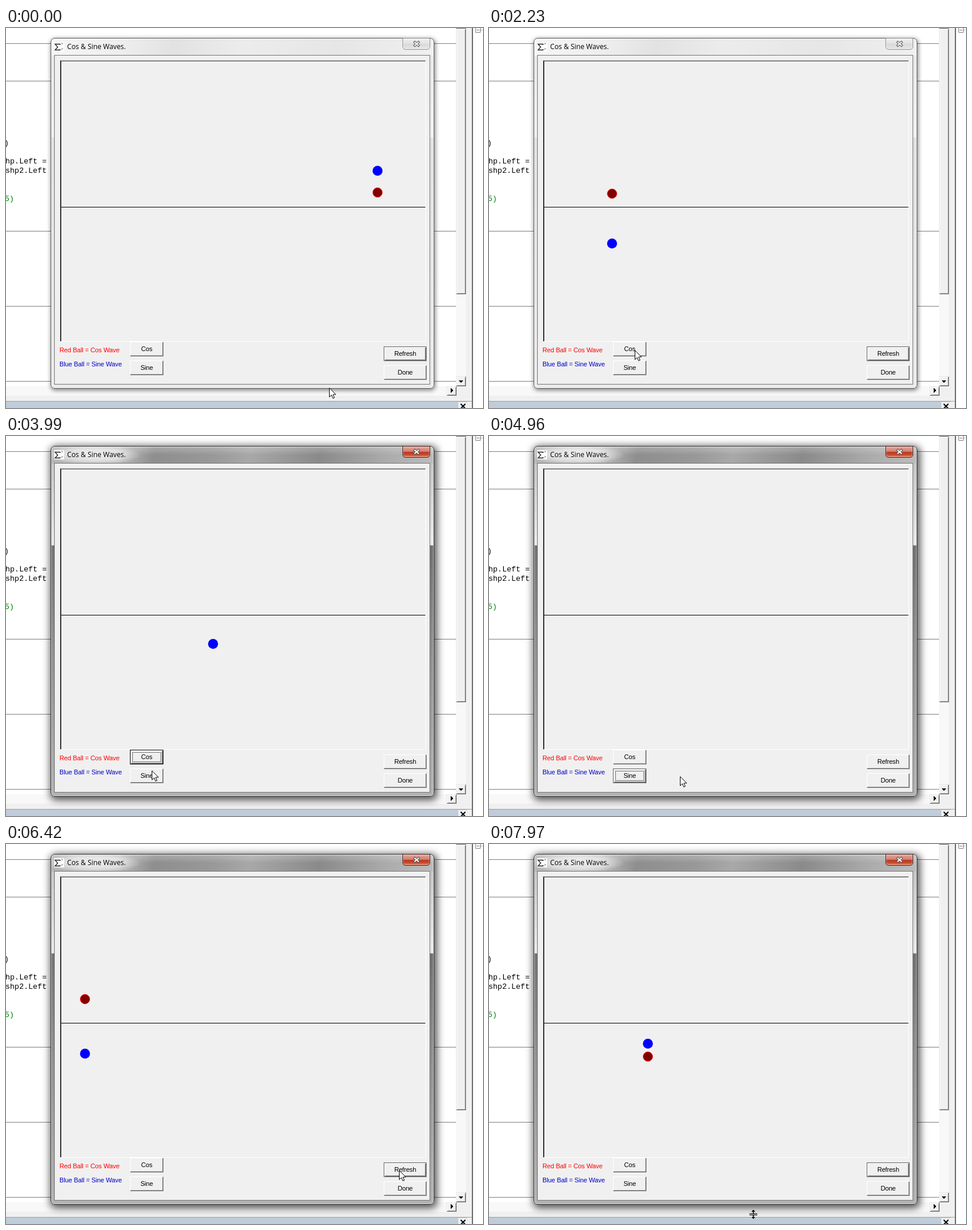
These frames come from a looping animation (812 px wide and 648 px high, 8000 ms). An HTML page:

```html
<!DOCTYPE html>
<html lang="en">
<head>
<meta charset="utf-8">
<title>Cos &amp; Sine Waves</title>
<style>
html, body { margin: 0; width: 100%; height: 100%; overflow: hidden; background: #fff; }
#stage { position: relative; width: 812px; height: 648px; overflow: hidden; background: #fff; }
#stage div, #stage svg { position: absolute; box-sizing: border-box; }

/* editor behind the form */
.rule { left: 0; width: 766px; height: 1px; background: #808080; }
.code { font: 13px/16px "Liberation Mono", monospace; white-space: pre; color: #000; }
.raised { background: #f0f0f0; border: 1px solid; border-color: #e3e3e3 #696969 #696969 #e3e3e3;
  box-shadow: inset 1px 1px #fff, inset -1px -1px #a0a0a0; }

/* form */
.win { inset: 0; transform-origin: 402px 305px; }
.frame { left: 76px; top: 17px; width: 653px; height: 598px; border: 1px solid #5c5c5c; border-radius: 7px;
  background: linear-gradient(100deg, #f6f6f6 0, #ededed 20%, #e2e2e2 32%, #ececec 50%, #e6e6e6 75%, #f0f0f0) 0 0 / 100% 29px no-repeat,
    linear-gradient(#e6e6e6, #f0f0f0 168px, #e0e0e0 169px, #ebebeb);
  box-shadow: inset 0 0 0 1px #fffb, 1px 2px 7px 1px #0007; }
.active .frame { border-color: #2e2e2e;
  background: radial-gradient(ellipse 82px 17px at 72px 14px, #fffc, #fff8 60%, #fff0) no-repeat,
    linear-gradient(#fff4, #fff0 14px) 0 0 / 100% 29px no-repeat,
    linear-gradient(100deg, #b4b4b4 0, #bcbcbc 18%, #8e8e8e 27%, #989898 42%, #a8a8a8 52%, #8a8a8a 70%, #acacac 88%, #bcbcbc) 0 0 / 100% 29px no-repeat,
    linear-gradient(#bcbcbc, #e9e9e9 168px, #707070 169px, #8c8c8c 330px, #b2b2b2);
  box-shadow: inset 0 0 0 1px #fff9, 2px 3px 13px 3px #000a; }
.icon { left: 82px; top: 24px; width: 17px; height: 16px; background: #fff; }
.title { left: 104px; top: 23px; font: 11.8px/17px "Open Sans", "Noto Sans", sans-serif; white-space: nowrap; color: #000; }
.close { left: 675px; top: 17px; width: 47px; height: 20px; border: 1px solid #8d8d8d; border-radius: 0 0 5px 5px;
  background: linear-gradient(#efefef, #e2e2e2 50%, #d8d8d8 51%, #e6e6e6); box-shadow: inset 0 0 0 1px #fff9; }
.active .close { border-color: #4b1a14;
  background: linear-gradient(#e5aaa0, #d27a6b 48%, #b93a24 50%, #c4452c 75%, #e08a6a); box-shadow: inset 0 0 0 1px #fff5; }
.client { left: 82px; top: 46px; width: 640px; height: 562px; background: #f0f0f0; border: 1px solid #777; }
.pic { left: 92px; top: 55px; width: 623px; height: 480px; overflow: hidden; background: #f0f0f0;
  border: 1px solid; border-color: #a0a0a0 #fff #fff #696969; box-shadow: inset 1px 0 #000, inset 0 1px #696969; }
.axis { left: 1px; top: 249px; width: 620px; height: 1px; background: #000; }
.ball { left: 0; top: 0; width: 17px; height: 17px; border-radius: 50%; }
.blue { background: #00f; }
.red { background: #800000; border: 1px solid #f00; }
.label, .btn { font: 11px/13px "Liberation Sans", Arial, sans-serif; white-space: nowrap; }
.label { left: 91px; letter-spacing: -.12px; }
.btn { color: #000; text-align: center; line-height: 22px; letter-spacing: -.2px; background: #f0f0f0;
  border: 1px solid; border-color: #fff #696969 #696969 #fff; box-shadow: inset -1px -1px #a0a0a0; }
.btn.main { border-color: #646464; box-shadow: inset 1px 1px #fff, inset -1px -1px #696969, inset -2px -2px #a0a0a0; }
.btn.cos.main { border-color: #000; }
.btn.down { box-shadow: inset 0 0 0 1px #a0a0a0; padding: 1px 0 0 1px; }
.btn.focus::after { content: ""; position: absolute; inset: 3px; border: 1px dotted #000; }
.cos, .sine { left: 211px; width: 57px; height: 25px; }
.refresh, .done { left: 643px; width: 73px; height: 25px; }
#veil { left: 62px; top: 8px; width: 685px; height: 619px; background: #0000000f; }
</style>
</head>
<body>
<div id="stage">
  <div class="rule" style="top:26px"></div>
  <div class="rule" style="top:90px"></div>
  <div class="rule" style="top:346px"></div>
  <div class="rule" style="top:474px"></div>
  <div class="rule" style="top:602px"></div>
  <div class="code" style="left:-3px;top:189px">)</div>
  <div class="code" style="left:-1px;top:220px">hp.Left = 0</div>
  <div class="code" style="left:-1px;top:236px">shp2.Left = 0</div>
  <div class="code" style="left:-2px;top:284px;color:#008000">5)</div>

  <div style="left:0;top:611px;width:783px;height:16px;background:#f8f8f8"></div>
  <div style="left:766px;top:0;width:17px;height:611px;background:#f8f8f8"></div>
  <div class="raised" style="left:766px;top:-16px;width:17px;height:17px"></div>
  <div class="raised" style="left:766px;top:1px;width:17px;height:453px"></div>
  <div class="raised" style="left:766px;top:594px;width:17px;height:17px"></div>
  <div class="raised" style="left:750px;top:611px;width:17px;height:16px"></div>
  <div style="left:767px;top:611px;width:27px;height:37px;background:#f0f0f0"></div>
  <div style="left:783px;top:0;width:11px;height:648px;background:#f0f0f0"></div>
  <div style="left:0;top:627px;width:794px;height:10px;background:#f0f0f0;border-bottom:1px solid #a0a0a0"></div>
  <div style="left:0;top:637px;width:786px;height:11px;background:#bfcddb"></div>
  <div style="left:770px;top:638px;width:16px;height:10px;background:#f0f0f0"></div>
  <div style="left:793px;top:0;width:2px;height:648px;background:#696969"></div>
  <svg width="812" height="648" style="left:0;top:0">
    <path d="M770 601h8l-4 4zM757 614v8l4-4z" shape-rendering="crispEdges"/>
    <path d="M774 641l8 8M782 641l-8 8" stroke="#000" stroke-width="2"/>
    <path d="M799.5 -1.5h8v9h-8zM801 3.5h5" fill="none" stroke="#808080"/>
    <path d="M808 3.5h4" stroke="#808080" stroke-dasharray="1"/>
  </svg>

  <div id="veil"></div>
  <template id="form">
    <div class="win">
      <div class="frame"></div>
      <div class="icon">
        <svg width="17" height="16" fill="none" stroke="#222">
          <path d="M10 5V3.500H1.500L6 8.500L1.500 13.500H10V12" stroke-width="1.300"/>
          <path d="M12 1l3 3M15 1l-3 3M12 10l1.500 2M15 10l-2.500 4" stroke="#777" stroke-width=".8"/>
        </svg>
      </div>
      <div class="title">Cos &amp; Sine Waves.</div>
      <div class="close">
        <svg width="45" height="18" style="left:0;top:0" fill="none">
          <path d="M18.500 5l9 8M27.500 5l-9 8" stroke="#555" stroke-width="4"/>
          <path d="M19.300 5.700l7.400 6.600M26.700 5.700l-7.400 6.600" stroke="#fff" stroke-width="2"/>
        </svg>
      </div>
      <div class="client"></div>
      <div class="pic">
        <div class="axis"></div>
        <div class="ball red"></div>
        <div class="ball blue"></div>
      </div>
      <div class="label" style="top:543px;color:#f00">Red Ball = Cos Wave</div>
      <div class="label" style="top:567px;color:#0000c8">Blue Ball = Sine Wave</div>
      <div class="btn cos" style="top:535px">Cos</div>
      <div class="btn sine" style="top:567px">Sine</div>
      <div class="btn refresh" style="top:543px">Refresh</div>
      <div class="btn done" style="top:575px">Done</div>
    </div>
  </template>

  <svg id="arrow" width="14" height="21" style="left:0;top:0">
    <path d="M.5 .8V16.300L4.200 12.900L6.600 18.500L9.100 17.400L6.700 12H11.500Z" fill="#fff" stroke="#000"/>
  </svg>
  <svg id="split" width="18" height="18" style="left:0;top:0">
    <path d="M9 0l4 4.500h-3V6.500h6v2H2v-2h6V4.500H5zM9 17l4-4.500h-3V10.500h6v-2H2v2h6v2H5z" stroke="#fff" stroke-width=".6"/>
    <path d="M2 8.500h14" stroke="#fff"/>
  </svg>
</div>
<script>
const LOOP = 8000;
const $ = id => document.getElementById(id);

// Screen refreshes: [time, index], evenly spaced in between.
const anchors = [[0, 0], [150, 1], [1110, 8], [1260, 9], [2230, 16], [2370, 17], [3170, 23], [3330, 24],
  [3470, 25], [4410, 32], [4550, 33], [4960, 36], [5990, 43], [6150, 44], [6420, 46], [7120, 51], [7280, 52], [7970, 57]];
const ticks = [];
anchors.forEach(([t, n], i) => {
  ticks[n] = t;
  const [t0, n0] = anchors[i - 1] || [t, n];
  for (let k = n0 + 1; k < n; k++) ticks[k] = t0 + (t - t0) * (k - n0) / (n - n0);
});

// Linear path through [time, ...values].
function along(points, t) {
  const i = points.findIndex(p => p[0] > t);
  if (i === 0) return points[0].slice(1);
  if (i < 0) return points[points.length - 1].slice(1);
  const a = points[i - 1], b = points[i], f = (t - a[0]) / (b[0] - a[0]);
  return a.slice(1).map((v, k) => v + (b[k + 1] - v) * f);
}

const firstRun = [[0, 632], [1110, 728.6], [2230, 828.3], [3170, 909.5], [4410, 1019.5]];
const secondRun = [[6150, 110], [6420, 134], [7120, 196], [7970, 270.2]];
const mouse = [[1110, 550, 613], [1260, 520, 621], [1400, 440, 612], [1680, 300, 570], [1950, 248, 549],
  [3600, 248, 549], [4010, 248, 580], [4820, 248, 580], [4960, 325, 580], [5250, 515, 565], [5550, 650, 554],
  [5700, 669, 556], [7120, 669, 556], [7280, 645, 580], [7560, 540, 615], [7700, 495, 621], [7830, 460, 630], [7970, 450, 631]];

function makeWindow() {
  const el = $("form").content.firstElementChild.cloneNode(true);
  $("stage").insertBefore(el, $("arrow"));
  const find = name => el.querySelector("." + name);
  return { el, find, red: find("red"), blue: find("blue") };
}
const first = makeWindow();
const second = makeWindow();

function place(el, x, y) { el.style.transform = `translate(${Math.round(x)}px,${Math.round(y)}px)`; }
function show(el, on) { el.style.display = on ? "" : "none"; }

function drawBalls(win, x) {
  if (x > 723) x -= 619.5;
  const angle = (4.5787 * x - 125.6) * Math.PI / 180;
  const y = wave => Math.round(304.8 + 66.67 * wave) - 64;
  place(win.red, Math.round(x) - 101, y(Math.cos(angle)));
  place(win.blue, Math.round(x) - 101, y(Math.sin(angle)));
}

function setButtons(win, main, focused, pressed) {
  for (const name of ["cos", "sine", "refresh"]) {
    const list = win.find(name).classList;
    list.toggle("main", name === main);
    list.toggle("focus", name === main && focused);
    list.toggle("down", name === main && pressed);
  }
}

function pose(win, opacity, tilt, scale) {
  win.el.style.opacity = opacity;
  win.el.style.transform = scale === 1 ? "none" : `perspective(2000px) rotateX(${tilt}deg) scale(${scale})`;
}

function draw(time) {
  let n = ticks.length - 1;
  while (n && ticks[n] > time + .01) n--;
  const t = ticks[n];

  show(first.el, n < 46);
  first.el.classList.toggle("active", n >= 19);
  show(first.red, n < 20);
  show(first.blue, n < 33);
  drawBalls(first, along(firstRun, t)[0]);
  const main = n < 19 ? "refresh" : n < 32 ? "cos" : n < 42 ? "sine" : "refresh";
  setButtons(first, main, n >= 19, [19, 32, 42, 43].includes(n));
  if (n < 44) pose(first, 1, 0, 1);
  else if (n === 44) pose(first, .95, 1, .988);
  else pose(first, .25, 4, .95);

  show(second.el, n >= 44);
  second.el.classList.add("active");
  drawBalls(second, along(secondRun, t)[0]);
  setButtons(second, "refresh", false, false);
  if (n === 44) pose(second, .04, -4, .91);
  else if (n === 45) pose(second, .8, -1, .98);
  else pose(second, 1, 0, 1);
  show($("veil"), n === 44);

  const [mx, my] = along(mouse, t);
  const onSplit = my >= 627;
  show($("arrow"), !onSplit);
  show($("split"), onSplit);
  place($("arrow"), mx, my);
  place($("split"), mx - 9, my - 8);
}

function loop() {
  draw(performance.now() % LOOP);
  requestAnimationFrame(loop);
}
loop();
</script>
</body>
</html>
```
